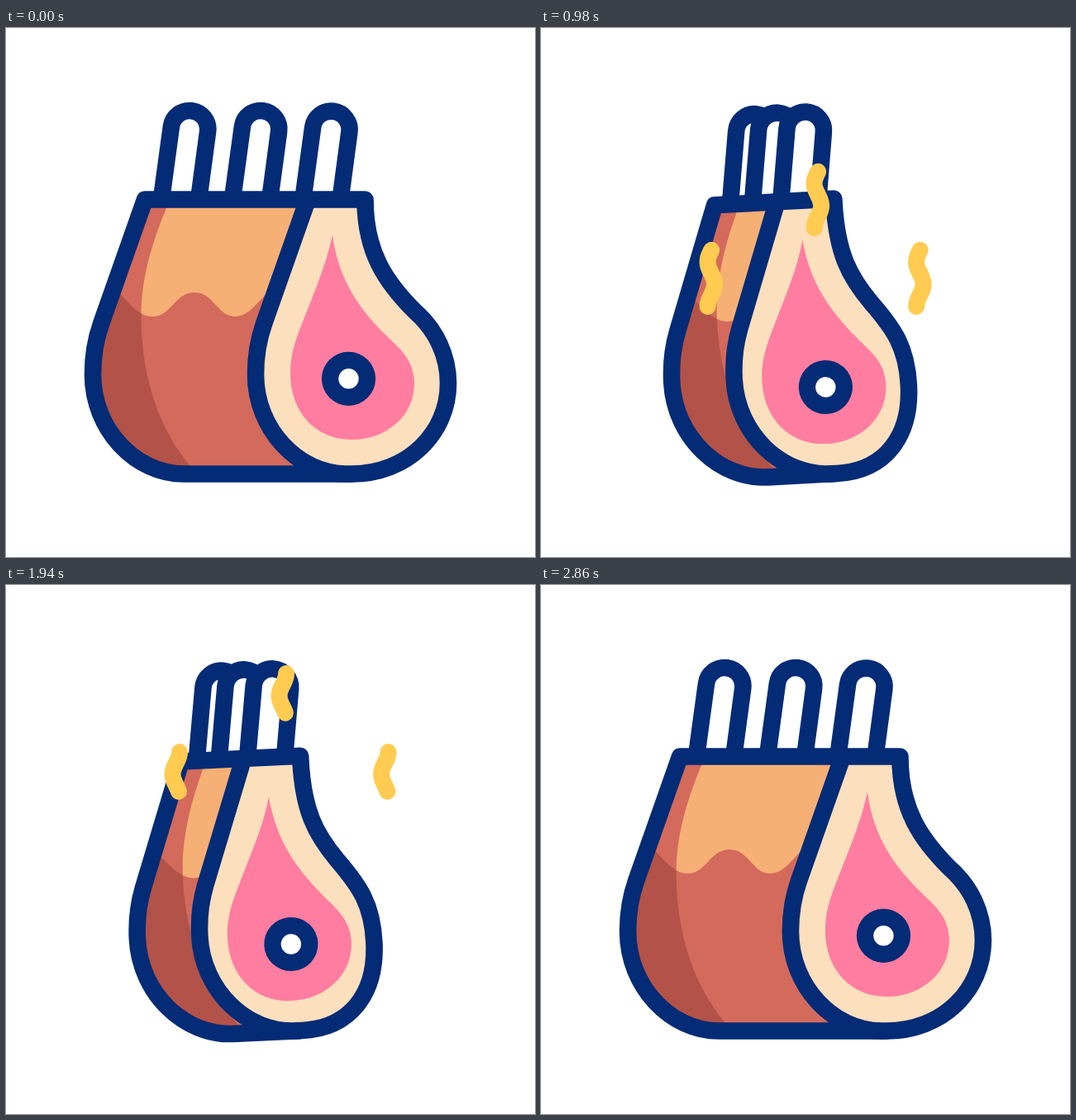
An HTML page that plays this animation: 640x640 px, repeating every 3.1 s.

```html
<!DOCTYPE html>
<html lang="en">
<head>
<meta charset="utf-8">
<title>Roast</title>
<style>
  html, body { margin: 0; width: 100%; height: 100%; overflow: hidden; background: #fff; }
  svg { display: block; width: 100vw; height: 100vh; }
  .ink { stroke: #042b76; stroke-width: 20.6; stroke-linejoin: round; stroke-linecap: round; }
  .glow { fill: none; stroke: #ffcb50; stroke-width: 20; stroke-linecap: round; stroke-linejoin: round; }
</style>
</head>
<body>
<svg viewBox="0 0 640 640">
  <defs>
    <clipPath id="backClip"><path id="backClipShape"/></clipPath>
    <path id="rib" class="ink" fill="#fff"
      d="M188 207L199.9 119.3A22.3 22.3 0 0 1 244.1 125.3L233.2 207"/>
  </defs>
  <g id="roast">
    <use id="rib0" href="#rib"/>
    <use id="rib1" href="#rib"/>
    <use id="rib2" href="#rib"/>
    <g id="back">
      <g clip-path="url(#backClip)">
        <rect x="80" y="190" width="400" height="370" fill="#d36a5c"/>
        <path fill="#b35248" d="M90 280L138 322C147 330 154 340 163.5 345C163 430 190 490 222 529L232 560H80Z"/>
        <path fill="#f6af75" d="M199 207L194 218C173 268 164 308 163.5 345C168 348 172 349 178 349
          C200 349 204 320 228 320C252 320 255 349 277 349C293 349 302 334 315 322L345 300L400 207Z"/>
      </g>
      <path id="backLine" class="ink" fill="none"/>
    </g>
    <g id="front">
      <path id="slice" class="ink" fill="#fcdfbd"/>
      <path id="meat" fill="#ff7da0"/>
      <g id="bone">
        <circle r="32.6" fill="#042b76"/>
        <circle r="12.2" fill="#fff"/>
      </g>
    </g>
  </g>
  <g id="streaks" class="glow"><path/><path/></g>
  <g id="steam" class="glow">
    <path/><path transform="translate(129 -95)"/><path transform="translate(252.5 0)"/>
  </g>
</svg>
<script>
const LOOP = 3100;
const PIVOT = "347 532";
const SWING = 5.8, SWING_PERIOD = 239.4, SWING_FROM = 583;
const SWING_TO = SWING_FROM + 7 * SWING_PERIOD;

const SLICE_SIDE = "L168 207.5L115 358C108 378 105 398 105 419C105 486 157 539.5 215 539.5";
const SLICE_LEFT = "M365 207.5L312 358C305 378 302 398 302 419C302 486 354 539.5 412 539.5";
const SLICE = {
  wide: SLICE_LEFT + "L418 539.5C486 539.5 535 490 535 430C535 396 520 365 495 343C460 308 434.5 272 434.5 207.5Z",
  tight: SLICE_LEFT + "L420 539.5C478 539.5 512.5 500 512.5 437C512.5 391 498 368 473 336C448 303 433.5 274 434 207.5Z"
};
const MEAT = {
  wide: "M395 250C388 284 375 315 358 358C349 380 344 398 344 418C344 465 375 498 418 498C462 498 494 468 494 430C494 400 474 386 458 370C428 340 402 305 395 250Z",
  tight: "M393.5 255C386 289 369 322 351.5 362C341 385 335.5 403 335.5 423C335.5 470 366 503 409 503C453 503 485 473 485 435C485 407 468 394 452 376C424 344 400 310 393.5 255Z"
};

const $ = id => document.getElementById(id);
const set = (el, name, value) => el.setAttribute(name, value);
const move = (el, x, y = 0) => set(el, "transform", `translate(${x} ${y})`);
const mix = (a, b, k) => a + (b - a) * k;

function ease(t, from, to) {
  const u = Math.min(1, Math.max(0, (t - from) / (to - from)));
  return u * u * (3 - 2 * u);
}

function blend({ wide, tight }, k) {
  const ends = tight.match(/[\d.]+/g);
  let i = 0;
  return wide.replace(/[\d.]+/g, n => mix(+n, +ends[i++], k).toFixed(2));
}

function swing(t) {
  if (t < SWING_FROM) return SWING * ease(t, 515, SWING_FROM);
  if (t > SWING_TO) return SWING * (1 - ease(t, SWING_TO, 2427));
  return SWING * Math.cos(2 * Math.PI * (t - SWING_FROM) / SWING_PERIOD);
}

function drawRoast(t) {
  const k = ease(t, 0, 510) - ease(t, 2440, 2870);
  const backX = 59 * k, frontX = -62.5 * k, gap = backX - frontX;
  set($("roast"), "transform", `rotate(${swing(t)} ${PIVOT})`);

  move($("rib0"), backX - k);
  move($("rib1"), 86 - k);
  move($("rib2"), 171.3 - 52 * k, 0.6);

  move($("back"), backX);
  const backPath = `M${365 - gap} 207.5${SLICE_SIDE}L${418 - gap} 539.5`;
  set($("backLine"), "d", backPath);
  set($("backClipShape"), "d", backPath + "Z");

  move($("front"), frontX);
  set($("slice"), "d", blend(SLICE, k));
  set($("meat"), "d", blend(MEAT, k));
  move($("bone"), mix(414.5, 412, k), mix(424.3, 434.5, k));
}

function drawStreaks(t) {
  const head = mix(554, 308, ease(t, 100, 420));
  const tail = mix(554, 308, ease(t, 240, 593));
  const [upper, lower] = $("streaks").children;
  const visible = tail - head > 0.3;
  set(upper, "d", visible ? `M${head} 404H${tail}` : "");
  set(lower, "d", visible ? `M${head - 30.5} 455.5H${tail - 30.5}` : "");
}

function drawSteam(t) {
  const top = mix(337, 202, ease(t, 530, 1425));
  const bottom = mix(337, 202, ease(t, 1405, 2300));
  const steps = 48;
  let d = "";
  if (bottom - top > 0.3) {
    for (let i = 0; i <= steps; i++) {
      const y = mix(top, bottom, i / steps);
      const x = 205.8 + 4.2 * Math.cos(2 * Math.PI * (y - 202) / 54);
      d += `${i ? "L" : "M"}${x.toFixed(2)} ${y.toFixed(2)}`;
    }
  }
  for (const wisp of $("steam").children) set(wisp, "d", d);
}

function render(t) {
  drawRoast(t);
  drawStreaks(t);
  drawSteam(t);
}

const start = performance.now();
function tick() {
  render((performance.now() - start) % LOOP);
  requestAnimationFrame(tick);
}
tick();
</script>
</body>
</html>
```
